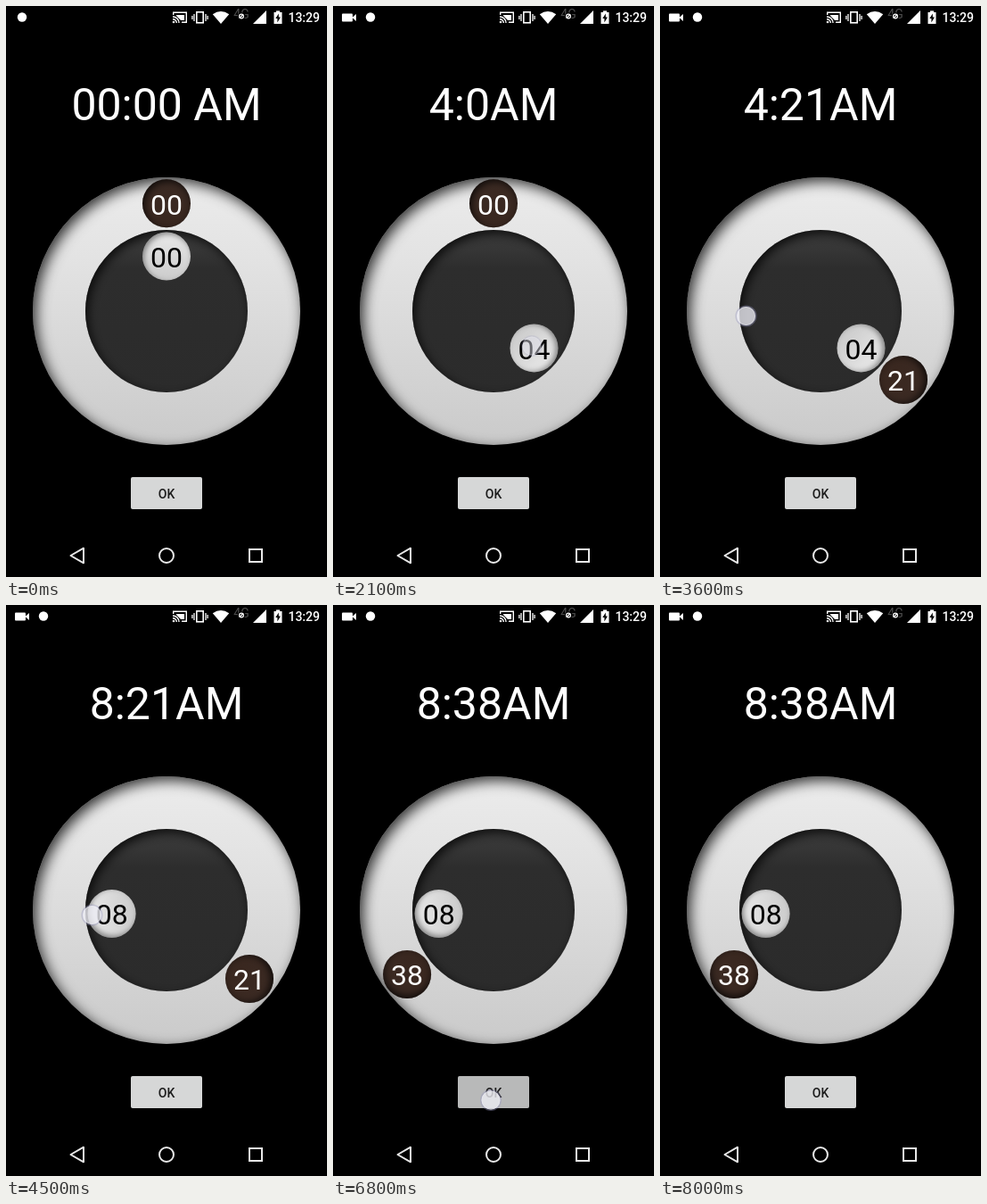
An HTML page with a canvas that plays this animation: 360x640 px, repeating every 8100 ms.

```html
<!DOCTYPE html>
<html lang="en">
<head>
<meta charset="utf-8">
<title>Time dial</title>
<style>
  html, body { margin: 0; width: 100%; height: 100%; overflow: hidden; background: #000; }
  canvas { display: block; width: 360px; height: 640px; }
</style>
</head>
<body>
<canvas id="stage" width="360" height="640"></canvas>
<script>
const ctx = document.getElementById('stage').getContext('2d');
const LOOP = 8100, STEP = 100;
const CX = 180, CY = 342, BALL = 27;
const HOUR_R = 61.5, MINUTE_R = 120.7;
const TAU = Math.PI * 2;

const clamp = x => Math.min(1, Math.max(0, x));
const ease = x => 0.5 - 0.5 * Math.cos(Math.PI * clamp(x));
const span = (t, from, to) => clamp((t - from) / (to - from));
const mix = (a, b, p) => a + (b - a) * p;

// Position on the dial, clockwise from the top
function polar(deg, r) {
  const a = deg * Math.PI / 180;
  return [CX + r * Math.sin(a), CY - r * Math.cos(a)];
}

// Hour: one drag, then a tap that swings it round
function hourAngle(t) {
  if (t < 4200) return 132.3 * ease(span(t, 1330, 2090));
  return mix(132.3, 266.3, ease(span(t, 4120, 4420)));
}

const drag = [0, 6, 18, 32, 47.7, 64, 88, 111, 125, 129.6];
function minuteAngle(t) {
  if (t >= 5900) return mix(129.6, 233.4, ease(span(t, 5760, 6060)));
  const x = clamp((t - 2400) / 900) * 9;
  const i = Math.min(8, Math.floor(x));
  return mix(drag[i], drag[i + 1], x - i);
}

// Values follow a drag live, but change only after a swing has ended
const hourValue = t => t < 4500 ? Math.floor(hourAngle(Math.min(t, 4100)) / 30) : 8;
const minuteValue = t => t < 6100 ? Math.floor(minuteAngle(Math.min(t, 5800)) / 6) : 38;

const touches = [
  { on: 1300, off: 2000, at: t => polar(hourAngle(t), 58) },
  { on: 2300, off: 3200, at: t => polar(minuteAngle(t + 100), mix(120, 109.5, span(t, 2300, 2700))) },
  { on: 3600, off: 4500, at: () => [96.5, 347.5] },
  { on: 5300, off: 6200, at: () => [74.8, 420.8] },
  { on: 6600, off: 6800, at: () => [177, 555] }
];

function disc(x, y, r, fill) {
  ctx.beginPath();
  ctx.arc(x, y, r, 0, TAU);
  ctx.fillStyle = fill;
  ctx.fill();
}

function shape(points, fill) {
  ctx.beginPath();
  points.forEach(p => ctx.lineTo(p[0], p[1]));
  ctx.closePath();
  if (fill) { ctx.fillStyle = fill; ctx.fill(); } else ctx.stroke();
}

function rect(x, y, w, h, fill) {
  ctx.fillStyle = fill;
  ctx.fillRect(x, y, w, h);
}

function arc(x, y, r, from, to) {
  ctx.beginPath();
  ctx.arc(x, y, r, from, to);
  ctx.stroke();
}

function text(str, x, y, font, fill, align = 'center') {
  ctx.font = font;
  ctx.textAlign = align;
  ctx.fillStyle = fill;
  ctx.fillText(str, x, y);
}

function innerShadow(x, y, r, dx, dy, blur, color) {
  ctx.save();
  ctx.beginPath();
  ctx.arc(x, y, r, 0, TAU);
  ctx.clip();
  ctx.shadowColor = color;
  ctx.shadowBlur = blur;
  ctx.shadowOffsetX = dx;
  ctx.shadowOffsetY = dy;
  ctx.beginPath();
  ctx.rect(x - r - 60, y - r - 60, 2 * r + 120, 2 * r + 120);
  ctx.arc(x, y, r + 0.4, 0, TAU, true);
  ctx.fillStyle = '#222';
  ctx.fill('evenodd');
  ctx.restore();
}

function gradient(x0, y0, x1, y1, colors) {
  const g = ctx.createLinearGradient(x0, y0, x1, y1);
  colors.forEach(([stop, c]) => g.addColorStop(stop, c));
  return g;
}

function drawDial() {
  disc(CX, CY, 150, gradient(0, 192, 0, 492, [[0, '#ececec'], [0.3, '#e3e3e3'], [1, '#cacaca']]));
  innerShadow(CX, CY, 150, 4, 5, 15, 'rgba(0,0,0,.8)');
  disc(CX, CY, 91, gradient(0, 251, 0, 433, [[0, '#383838'], [0.12, '#363636'], [0.24, '#2d2d2d'], [1, '#2b2b2b']]));
  innerShadow(CX, CY, 91, 3, 4, 12, 'rgba(0,0,0,.8)');
}

// The shading of a ball turns with its angle
function drawBall(deg, orbit, value, dark) {
  const [x, y] = polar(deg, orbit);
  const a = deg * Math.PI / 180, s = Math.sin(a), c = Math.cos(a);
  const colors = dark ? [[0, '#3b2a23'], [1, '#39271f']] : [[0, '#e9e9e9'], [1, '#cbcbcb']];
  disc(x, y, BALL, gradient(x + BALL * s, y - BALL * c, x - BALL * s, y + BALL * c, colors));
  const dx = 2, dy = 2.5;
  innerShadow(x, y, BALL, dx * c - dy * s, dx * s + dy * c, dark ? 9 : 6,
    dark ? 'rgba(0,0,0,.8)' : 'rgba(0,0,0,.45)');
  text(String(value).padStart(2, '0'), x, y + 12.5, '32px Roboto, sans-serif', dark ? '#fff' : '#000');
}

function drawTouch(t) {
  for (const { on, off, at } of touches) {
    const alpha = t < on ? 0 : 1 - span(t, off, off + 200);
    if (!alpha) continue;
    const [x, y] = at(t);
    ctx.save();
    ctx.globalAlpha = alpha;
    disc(x, y, 12, 'rgba(150,150,190,.4)');
    disc(x, y, 10.5, 'rgba(255,255,255,.65)');
    ctx.strokeStyle = 'rgba(235,235,245,.5)';
    ctx.lineWidth = 1;
    arc(x, y, 10, 0, TAU);
    ctx.restore();
  }
}

function drawStatus(t) {
  const w = '#fff';
  ctx.strokeStyle = w;
  if (t >= 100) {
    ctx.beginPath();
    ctx.roundRect(10, 8.5, 12, 9, 1);
    ctx.fillStyle = w;
    ctx.fill();
    shape([[21.5, 13], [26, 9], [26, 17]], w);
  }
  disc(t >= 100 ? 42 : 18, 12.5, 5.2, w);

  // Cast
  ctx.lineWidth = 1.4;
  ctx.beginPath();
  ctx.moveTo(187.7, 10);
  ctx.lineTo(187.7, 7.2);
  ctx.lineTo(202.3, 7.2);
  ctx.lineTo(202.3, 18.3);
  ctx.lineTo(197, 18.3);
  ctx.stroke();
  rect(191, 10, 9, 6, w);
  shape([[187, 11], [191, 11], [196, 16], [196, 19], [187, 19]], '#000');
  arc(187, 19, 7, -Math.PI / 2, 0);
  arc(187, 19, 4.3, -Math.PI / 2, 0);
  disc(188, 18, 1.3, w);

  // Vibrate
  ctx.lineWidth = 1.6;
  ctx.strokeRect(213.8, 6.8, 7.4, 12);
  ctx.lineWidth = 1.3;
  for (const [x, h] of [[211, 4], [208.9, 2], [224, 4], [226.1, 2]]) {
    ctx.beginPath();
    ctx.moveTo(x, 13 - h);
    ctx.lineTo(x, 13 + h);
    ctx.stroke();
  }

  // Wi-Fi
  ctx.beginPath();
  ctx.moveTo(241, 20);
  ctx.lineTo(231.8, 9.2);
  ctx.quadraticCurveTo(241, 2.8, 250.2, 9.2);
  ctx.fillStyle = w;
  ctx.fill();

  // Mobile network
  text('4G', 264, 14, '14px Roboto, sans-serif', '#4c4c4c');
  disc(264, 11.5, 4.2, '#000');
  ctx.lineWidth = 1.2;
  arc(264, 11.5, 2.4, 0, TAU);
  ctx.beginPath();
  ctx.moveTo(262, 13.5);
  ctx.lineTo(266, 9.5);
  ctx.stroke();
  shape([[277, 20], [292, 5], [292, 20]], w);

  // Battery
  rect(300.5, 7, 9, 13, w);
  rect(303, 5.4, 4, 2, w);
  shape([[305.8, 8.5], [302.3, 14], [304.4, 14], [304.4, 18.5], [307.9, 12.6], [305.8, 12.6]], '#000');
  text('13:29', 352, 18, '500 14px Roboto, sans-serif', w, 'right');
}

function drawButton(t) {
  ctx.beginPath();
  ctx.roundRect(140, 528, 80, 36, 2);
  ctx.fillStyle = '#d6d7d7';
  ctx.fill();
  if (t >= 6800) {
    ctx.fillStyle = `rgba(0,0,0,${0.14 * (1 - span(t, 6900, 7300))})`;
    ctx.fill();
  }
  text('OK', 180, 551.5, '500 14px Roboto, sans-serif', '#1c1c1c');
}

function drawSnackbar(t) {
  const p = ease(span(t, 6850, 7200)) - ease(span(t, 7740, 8000));
  if (p <= 0) return;
  const y = 592 - 47 * p;
  rect(0, y, 360, 48, '#323232');
  text('时间已设定', 24, y + 29, '14px "Noto Sans CJK SC", "Noto Sans CJK", sans-serif', '#fff', 'left');
}

function drawNav() {
  rect(0, 592, 360, 48, '#000');
  ctx.strokeStyle = '#e8e8e8';
  ctx.lineWidth = 2;
  ctx.lineJoin = 'round';
  shape([[72.5, 616], [87, 607.7], [87, 624.3]]);
  arc(180, 616, 8, 0, TAU);
  ctx.lineJoin = 'miter';
  ctx.strokeRect(273, 609, 14, 14);
}

function draw(t) {
  rect(0, 0, 360, 640, '#000');
  drawStatus(t);
  const h = hourValue(t), m = minuteValue(t);
  const clock = t < 1400 ? '00:00 AM' : `${h}:${m}AM`;
  text(clock, 180, 128, '50px Roboto, sans-serif', '#fff');
  drawDial();
  drawBall(minuteAngle(t), MINUTE_R, m, true);
  drawBall(hourAngle(t), HOUR_R, h, false);
  drawButton(t);
  drawSnackbar(t);
  drawNav();
  drawTouch(t);
}

let shown = -1;
function tick() {
  const t = Math.floor(performance.now() % LOOP / STEP) * STEP;
  if (t !== shown) draw(shown = t);
  requestAnimationFrame(tick);
}
tick();
</script>
</body>
</html>
```
